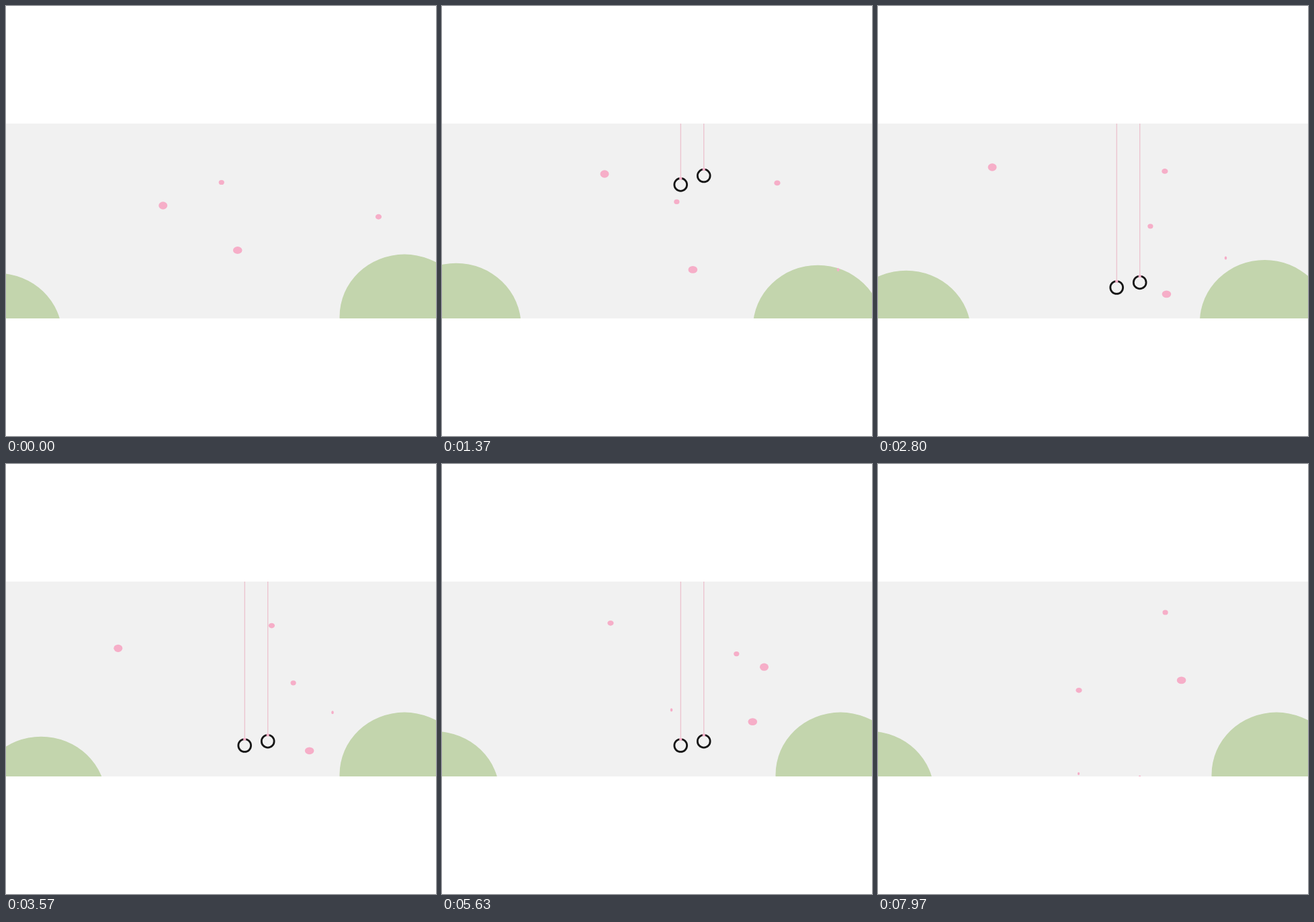
Animation of 640x640 px, one loop 8 s. Source, as an HTML page with a canvas:

```html
<!DOCTYPE html>
<html lang="en">
<head>
<meta charset="utf-8">
<title>Rings and hills</title>
<style>
  html, body { margin: 0; width: 100%; height: 100%; overflow: hidden; background: #fff; }
  canvas { display: block; width: 100vmin; height: 100vmin; }
</style>
</head>
<body>
<canvas id="stage" width="640" height="640"></canvas>
<script>
const ctx = document.getElementById('stage').getContext('2d');
const LOOP = 8000;
const TOP = 175, HEIGHT = 290;
const BAND = '#f1f1f1', HILL = '#c3d5ad', PINK = '#f6aec8', STRING = '#eab9c6', BLACK = '#161616';

// Progress from 0 to 1 between two times, slow at both ends.
function ease(t, start, end) {
  const p = Math.min(1, Math.max(0, (t - start) / (end - start)));
  return (1 - Math.cos(Math.PI * p)) / 2;
}

// Smooth curve through a few key points at shared times.
const KEY_TIMES = [0, 1370, 2130, 3570, 4770, 6430, 7970];

function curve(values, t) {
  const last = KEY_TIMES.length - 1;
  const slope = i => (values[i + 1] - values[i]) / (KEY_TIMES[i + 1] - KEY_TIMES[i]);
  const tangent = i => {
    if (i === 0) return slope(0);
    if (i === last) return slope(last - 1);
    const before = KEY_TIMES[i] - KEY_TIMES[i - 1], after = KEY_TIMES[i + 1] - KEY_TIMES[i];
    return (slope(i - 1) * after + slope(i) * before) / (before + after);
  };
  let i = 0;
  while (i < last - 1 && t > KEY_TIMES[i + 1]) i++;
  const span = KEY_TIMES[i + 1] - KEY_TIMES[i];
  const u = Math.min(1, (t - KEY_TIMES[i]) / span), v = 1 - u;
  return values[i] * (1 + 2 * u) * v * v + values[i + 1] * (1 + 2 * v) * u * u
    + span * u * v * (tangent(i) * v - tangent(i + 1) * u);
}

const roamer = {
  x: [233.7, 242, 203.4, 166.8, 308.5, 624, 700],
  y: [297, 250, 225.7, 274.3, 316, 248, 10],
};
const riser = {
  x: [344.7, 373.3, 404, 451.6, 460.5, 461, 451.6],
  y: [363.5, 392.4, 420.3, 426.8, 412.3, 354.8, 321.9],
};
const drifter = {
  x: [554.5, 499, 451.8, 395.5, 293, 239, 299],
  y: [313.8, 263.4, 251.9, 240.6, 229, 257.4, 336.8],
};

function ellipse(x, y, rx, ry, color) {
  ctx.fillStyle = color;
  ctx.beginPath();
  ctx.ellipse(x, y, rx, ry, 0, 0, Math.PI * 2);
  ctx.fill();
}

const hill = (x, y) => ellipse(x, y, 96.5, 92.6, HILL);

function dot(path, t, rx, ry, dx = 0, dy = 0) {
  ellipse(curve(path.x, t) + dx, curve(path.y, t) + dy, rx, ry, PINK);
}

// A ring that is let down on its string and pulled up again.
function ring(x, depth, t, arrived, gone) {
  const hidden = TOP - 12;
  const y = hidden + (depth - hidden) * (ease(t, 300, arrived) - ease(t, 5920, gone));
  ctx.strokeStyle = BLACK;
  ctx.lineWidth = 2.8;
  ctx.beginPath();
  ctx.arc(x, y, 9.4, 0, Math.PI * 2);
  ctx.stroke();
  ctx.fillStyle = STRING;
  ctx.fillRect(x - 0.5, TOP, 1.1, Math.max(0, y - 10 - TOP));
  ctx.fillStyle = PINK;
  ctx.fillRect(x - 2, y - 11, 4, 3.6);
}

function draw(t) {
  ctx.fillStyle = '#fff';
  ctx.fillRect(0, 0, 640, 640);
  ctx.save();
  ctx.beginPath();
  ctx.rect(0, TOP, 640, HEIGHT);
  ctx.clip();
  ctx.fillStyle = BAND;
  ctx.fillRect(0, TOP, 640, HEIGHT);

  // The left hill goes round a triangle, the right one out and back.
  const rise = ease(t, 100, 1900), sink = ease(t, 1900, 3600), back = ease(t, 3600, 5900);
  hill(-13 + 42.5 * rise + 22.7 * sink - 65.2 * back, 490.3 - 18.6 * rise + 26.6 * sink - 8 * back);
  const swing = ease(t, 100, 1850) - ease(t, 1850, 3600);
  hill(593 - 40.7 * swing, 462.2 + 19.6 * swing);

  ring(355.2, 419, t, 2750, 7195);
  ring(389.7, 412.7, t, 2920, 7680);

  dot(roamer, t, 6.5, 5.7);
  dot(riser, t, 6.8, 5.4);
  dot(riser, t, 4.1, 3.6, -24, -101);
  dot(riser, t, 1.6, 2.1, -153, 139);
  dot(drifter, t, 4.6, 3.9);
  dot(drifter, t, 1.8, 2.5, 90.6, 129.2);
  ctx.restore();
}

const begin = performance.now();
function tick() {
  draw((performance.now() - begin) % LOOP);
  requestAnimationFrame(tick);
}
tick();
</script>
</body>
</html>
```
